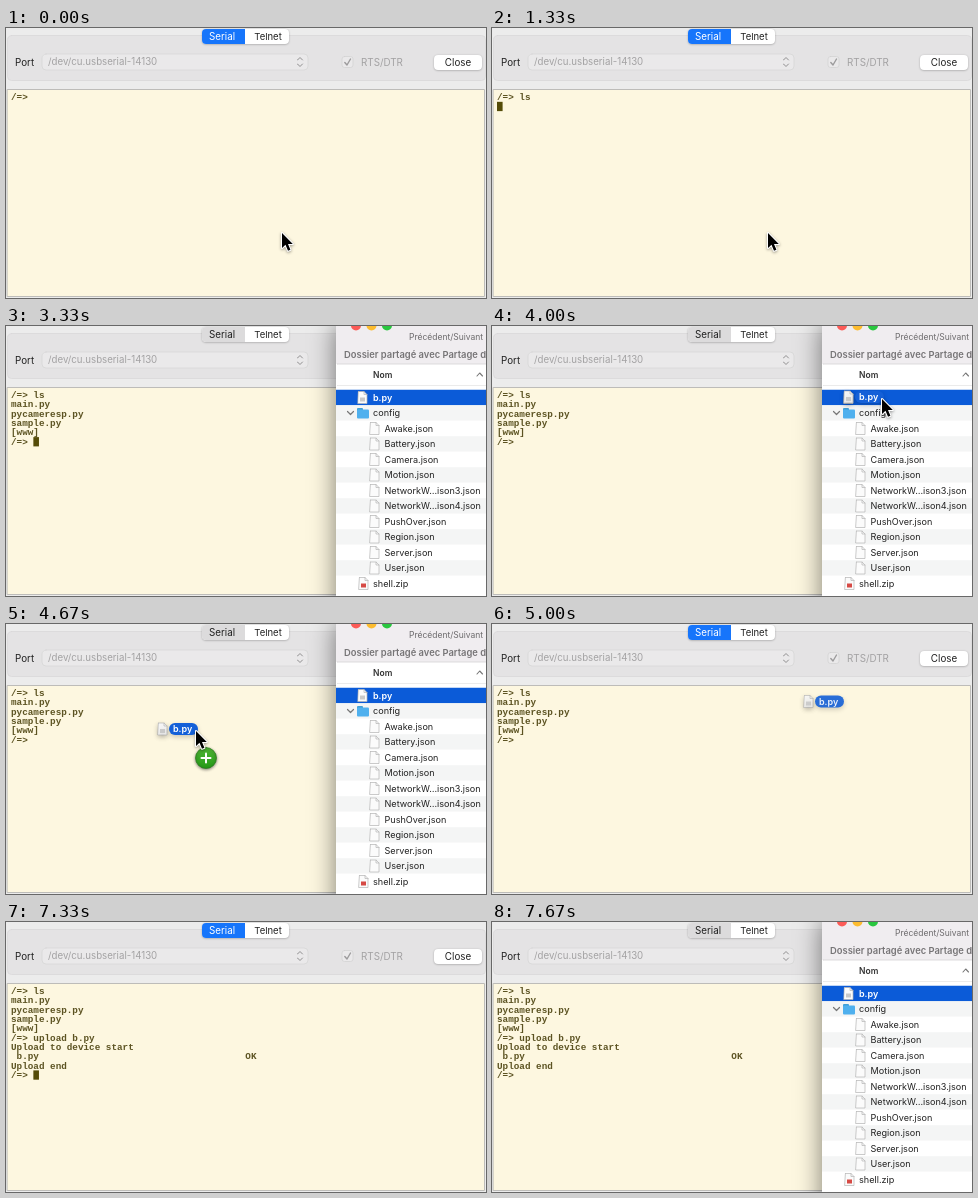
Write an HTML page with a canvas that moves like this. It is 480 by 270 pixels and loops after 8000 ms.

```html
<!DOCTYPE html>
<html lang="fr">
<head>
<meta charset="utf-8">
<style>
html, body { margin: 0; width: 100%; height: 100%; overflow: hidden; background: #ececec; }
canvas { display: block; }
</style>
</head>
<body>
<canvas id="stage" width="480" height="270"></canvas>
<script>
const ctx = document.getElementById('stage').getContext('2d');
const LOOP = 8000;
const SANS = 'Inter, "Open Sans", sans-serif';
const MONO = '"Liberation Mono", "Courier New", monospace';
const COL = 5.59, LINE = 9.32;

function box(x, y, w, h, r, fill, stroke) {
  ctx.beginPath();
  ctx.roundRect(x, y, w, h, r);
  if (fill) { ctx.fillStyle = fill; ctx.fill(); }
  if (stroke) { ctx.strokeStyle = stroke; ctx.lineWidth = 0.7; ctx.stroke(); }
}

function disc(x, y, r, fill, stroke) {
  box(x - r, y - r, 2 * r, 2 * r, r, fill, stroke);
}

function label(str, x, y, color = '#222', size = 9.8, weight = 400, align = 'left') {
  ctx.font = `${weight} ${size}px ${SANS}`;
  ctx.textAlign = align;
  ctx.textBaseline = 'alphabetic';
  ctx.fillStyle = color;
  ctx.fillText(str, x, y + size * 0.36);
}

function line(points, color, width = 1) {
  ctx.beginPath();
  points.forEach(([x, y]) => ctx.lineTo(x, y));
  ctx.strokeStyle = color;
  ctx.lineWidth = width;
  ctx.lineCap = ctx.lineJoin = 'round';
  ctx.stroke();
}

function withShadow(color, blur, dy, draw) {
  ctx.save();
  ctx.shadowColor = color;
  ctx.shadowBlur = blur;
  ctx.shadowOffsetY = dy;
  draw();
  ctx.restore();
}

function drawToolbar(active) {
  ctx.fillStyle = '#ececec';
  ctx.fillRect(0, 0, 480, 270);
  box(1.5, 7.5, 478, 45, 4, '#e4e3e4', '#d8d7d8');

  withShadow('rgba(0,0,0,.3)', 2, 0.5, () => box(196, 1, 87, 15, 4, '#fff'));
  box(196, 1, 43, 15, [4, 0, 0, 4], active ? '#1675fb' : '#dcdbdc');
  label('Serial', 216, 8.5, active ? '#fff' : '#222', 9.8, 400, 'center');
  label('Telnet', 262, 8.5, '#222', 9.5, 400, 'center');

  label('Port', 9, 34);
  box(36, 26, 266, 16, 4, '#eae9ea', '#d5d4d5');
  label('/dev/cu.usbserial-14130', 42, 34, '#a3a2a3', 9.7);
  line([[291.5, 32], [294, 29.5], [296.5, 32]], '#908f90');
  line([[291.5, 36], [294, 38.5], [296.5, 36]], '#908f90');

  box(336, 28.5, 11, 11, 2.5, '#eae9ea', '#d2d1d2');
  line([[338.8, 34.5], [341, 37], [344.5, 31]], '#9c9b9c', 1.4);
  label('RTS/DTR', 355, 34, '#a3a2a3');
  withShadow('rgba(0,0,0,.3)', 2, 0.5, () => box(428, 27, 48, 15, 4, '#fff'));
  label('Close', 452, 34, '#222', 9.8, 400, 'center');
}

const LISTING = ['/=> ls', 'main.py', 'pycameresp.py', 'sample.py', '[www]'];
const UPLOAD = ['/=> upload b.py', 'Upload to device start'];

function terminalLines(t) {
  if (t < 670) return ['/=> '];
  if (t < 1000) return ['/=> l'];
  if (t < 1330) return ['/=> ls'];
  if (t < 1670) return ['/=> ls', ''];
  if (t < 5330) return [...LISTING, '/=> '];
  const progress = ' b.py'.padEnd(42);
  if (t < 6000) return [...LISTING, ...UPLOAD, progress];
  return [...LISTING, ...UPLOAD, progress + 'OK', 'Upload end', '/=> '];
}

function drawTerminal(t) {
  ctx.fillStyle = '#fdf7e0';
  ctx.fillRect(1, 61, 478, 208);
  ctx.strokeStyle = '#bdbcb9';
  ctx.lineWidth = 1;
  ctx.strokeRect(1.5, 61.5, 477, 207);

  const lines = terminalLines(t);
  ctx.font = `bold ${COL / 0.6}px ${MONO}`;
  ctx.textAlign = 'left';
  ctx.textBaseline = 'alphabetic';
  ctx.fillStyle = '#5c5322';
  lines.forEach((str, i) => ctx.fillText(str, 5, 72 + i * LINE));

  const blink = t % 1000;
  if (blink >= 330 && blink < 670) {
    const last = lines.length - 1;
    ctx.fillStyle = '#554c08';
    ctx.fillRect(5 + lines[last].length * COL, 64.5 + last * LINE, 5.6, 9.3);
  }
}

function drawDocument(x, y, tint = '#c9c9c9') {
  ctx.beginPath();
  [[0, 0], [6, 0], [9, 3], [9, 12], [0, 12]].forEach(([dx, dy]) => ctx.lineTo(x + dx, y - 6 + dy));
  ctx.closePath();
  ctx.fillStyle = '#fbfbfb';
  ctx.fill();
  ctx.strokeStyle = '#b5b5b5';
  ctx.lineWidth = 0.7;
  ctx.stroke();
  line([[x + 6, y - 6], [x + 6, y - 3], [x + 9, y - 3]], '#b5b5b5', 0.7);
  if (tint) {
    ctx.fillStyle = tint;
    ctx.fillRect(x + 2, y, 5, 4);
  }
}

const FILES = ['Awake', 'Battery', 'Camera', 'Motion', 'NetworkW…ison3', 'NetworkW…ison4',
  'PushOver', 'Region', 'Server', 'User'];
const ROW = 15.5;
const rowY = i => 71.5 + i * ROW;

function drawFinder() {
  withShadow('rgba(0,0,0,.5)', 26, 6, () => box(330, -8, 170, 300, 6, '#fff'));
  ctx.fillStyle = '#f0edf0';
  ctx.fillRect(330, 0, 150, 38);
  ['#fc5b57', '#fdbc2f', '#29c73f'].forEach((color, i) => disc(350 + i * ROW, -0.5, 5, color));
  label('Précédent/Suivant', 403, 11, '#6d6b6d', 8.5);
  label('Dossier partagé avec Partage de', 338, 28.5, '#767476', 9.4, 600);
  line([[331, 38], [480, 38]], '#d5d3d5', 0.8);
  label('Nom', 367, 48.5, '#333', 8.5, 600);
  line([[471, 50], [473.7, 47], [476.5, 50]], '#777', 1.1);
  line([[331, 59.5], [480, 59.5]], '#e2e2e2', 0.7);

  for (let i = 0; i < 13; i++) {
    ctx.fillStyle = i === 0 ? '#0b5bd8' : i % 2 ? '#f4f5f5' : '#fff';
    ctx.fillRect(330, rowY(i) - ROW / 2, 150, ROW);
  }
  drawDocument(352, rowY(0));
  label('b.py', 367, rowY(0), '#fff', 9, 600);

  const folderY = rowY(1);
  line([[341.5, folderY - 1.5], [344.5, folderY + 1.5], [347.5, folderY - 1.5]], '#777', 1.2);
  box(351, folderY - 5, 6, 4, 1, '#3f9fd6');
  box(351, folderY - 3.5, 12, 9, 1, '#4fb0ee');
  label('config', 367, folderY, '#222', 9.1);

  FILES.forEach((name, i) => {
    drawDocument(364, rowY(i + 2), null);
    label(name + '.json', 378.5, rowY(i + 2), '#222', 9.1);
  });
  drawDocument(353, rowY(12), '#d64a45');
  label('shell.zip', 367, rowY(12), '#222', 9.1);
}

function drawPointer(x, y) {
  const shape = [[0, 0], [0, 15], [3.5, 11.8], [6, 17.8], [8.4, 16.8], [6, 11], [10.8, 11]];
  withShadow('rgba(0,0,0,.4)', 3, 1, () => {
    ctx.beginPath();
    shape.forEach(([dx, dy]) => ctx.lineTo(x + dx, y + dy));
    ctx.closePath();
    ctx.lineJoin = 'round';
    ctx.lineWidth = 2;
    ctx.strokeStyle = '#fff';
    ctx.stroke();
  });
  ctx.fillStyle = '#000';
  ctx.fill();
}

function drawDraggedFile(x, y, opacity = 1) {
  ctx.save();
  ctx.globalAlpha = opacity;
  withShadow('rgba(0,0,0,.2)', 5, 2, () => {
    drawDocument(x + 1, y);
    box(x + 12, y - 6, 29, 12, 6, '#1460d8');
  });
  label('b.py', x + 16, y, '#fff', 9, 600);
  ctx.restore();
}

function drawCopyBadge(x, y) {
  const green = ctx.createLinearGradient(0, y - 10, 0, y + 10);
  green.addColorStop(0, '#4fb535');
  green.addColorStop(1, '#259a17');
  withShadow('rgba(0,0,0,.45)', 3, 1, () => disc(x, y, 10.5, green, '#2c7a22'));
  line([[x - 4.5, y], [x + 4.5, y]], '#fff', 2);
  line([[x, y - 4.5], [x, y + 4.5]], '#fff', 2);
}

function drawDrag(x, y, copying) {
  drawDraggedFile(x, y);
  if (copying) drawCopyBadge(x + 49, y + 29);
  drawPointer(x + 39, y + 2);
}

function drawMouse(t) {
  if (t < 2330) drawPointer(276, 205);
  else if (t < 3670) return;
  else if (t < 4000) drawPointer(415, 76);
  else if (t < 4330) drawDrag(351, 71, false);
  else if (t < 4670) drawDrag(251, 88, true);
  else if (t < 5000) drawDrag(151, 105, true);
  else if (t < 5330) drawDraggedFile(311, 77.5, 0.9);
}

function render(now) {
  const t = now % LOOP;
  const finderOpen = (t >= 3330 && t < 5000) || t >= 7670;
  drawToolbar(!finderOpen);
  drawTerminal(t);
  if (finderOpen) drawFinder();
  drawMouse(t);
}

const start = performance.now();
function tick() {
  render(performance.now() - start);
  requestAnimationFrame(tick);
}
tick();
</script>
</body>
</html>
```
